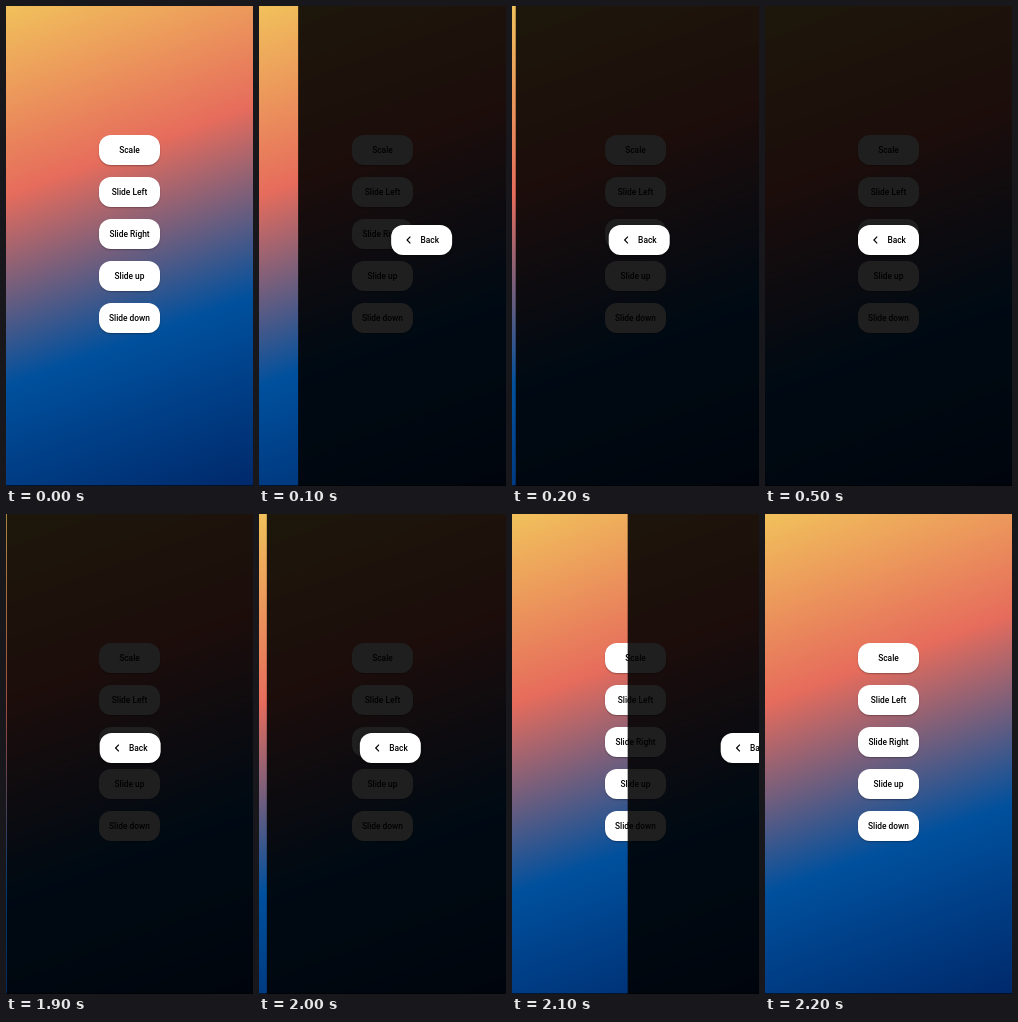
Recreate the animation shown at these times as an HTML page. Size 247x480 px, loop 3.2 s.

```html
<!DOCTYPE html>
<html lang="en">
<head>
<meta charset="utf-8">
<title>Page slide transition</title>
<style>
  html, body { margin: 0; width: 100%; height: 100%; overflow: hidden; background: #001f4d; }
  #stage {
    position: relative; width: 247px; height: 480px; overflow: hidden;
    background: linear-gradient(160deg, #f1c15b, #e66c5c 33.3%, #00509d 66.7%, #00296b);
    font: 500 8.4px/30px Roboto, sans-serif; color: #000;
  }
  #stage::after {
    content: ""; position: absolute; left: 0; right: 0; bottom: 0; height: 1px;
    background: rgba(0, 0, 0, .6);
  }
  .button {
    position: absolute; left: 93.2px; width: 60.6px; height: 30px;
    border-radius: 12px; background: #fff; text-align: center; white-space: nowrap;
    box-shadow: 0 1px 1.5px rgba(0, 0, 0, .3);
  }
  #page { position: absolute; inset: 0; background: rgba(0, 0, 0, .88); }
  #back { top: 218.6px; text-align: left; box-shadow: 0 1px 3px rgba(0, 0, 0, .5); }
  #back span { position: absolute; left: 29.2px; }
  #back svg { position: absolute; left: 14.8px; top: 11.4px; }
</style>
</head>
<body>
<div id="stage">
  <div id="menu"></div>
  <div id="page">
    <div class="button" id="back">
      <svg width="5" height="8" fill="none" stroke="#000" stroke-width="1.2"><path d="M4.2.7 .9 4l3.3 3.3"/></svg>
      <span>Back</span>
    </div>
  </div>
</div>
<script>
const LOOP = 3200, STEP = 100, WIDTH = 247, DURATION = 350;
const menu = document.getElementById('menu');
const page = document.getElementById('page');

['Scale', 'Slide Left', 'Slide Right', 'Slide up', 'Slide down'].forEach((label, i) => {
  const button = document.createElement('div');
  button.className = 'button';
  button.textContent = label;
  button.style.top = 128.6 + 42 * i + 'px';
  menu.append(button);
});

// cubic-bezier(.18, 1, .04, 1), solved by bisection
function ease(x) {
  if (x <= 0) return 0;
  if (x >= 1) return 1;
  let low = 0, high = 1;
  for (let i = 0; i < 24; i++) {
    const s = (low + high) / 2, r = 1 - s;
    if (3 * r * r * s * .18 + 3 * r * s * s * .04 + s ** 3 < x) low = s;
    else high = s;
  }
  return 1 - (1 - low) ** 3;
}

// The page enters at 36 ms and has left again by 2131 ms.
function pageOffset(time) {
  if (time < STEP) return WIDTH;
  const progress = time < 1800 ? (time - 36) / DURATION : (2131 - time) / DURATION;
  return WIDTH * (1 - ease(progress));
}

function draw(now) {
  const time = Math.floor((now % LOOP) / STEP) * STEP;
  page.style.transform = `translateX(${pageOffset(time).toFixed(2)}px)`;
  requestAnimationFrame(() => draw(performance.now() - start));
}

const start = performance.now();
draw(0);
</script>
</body>
</html>
```
